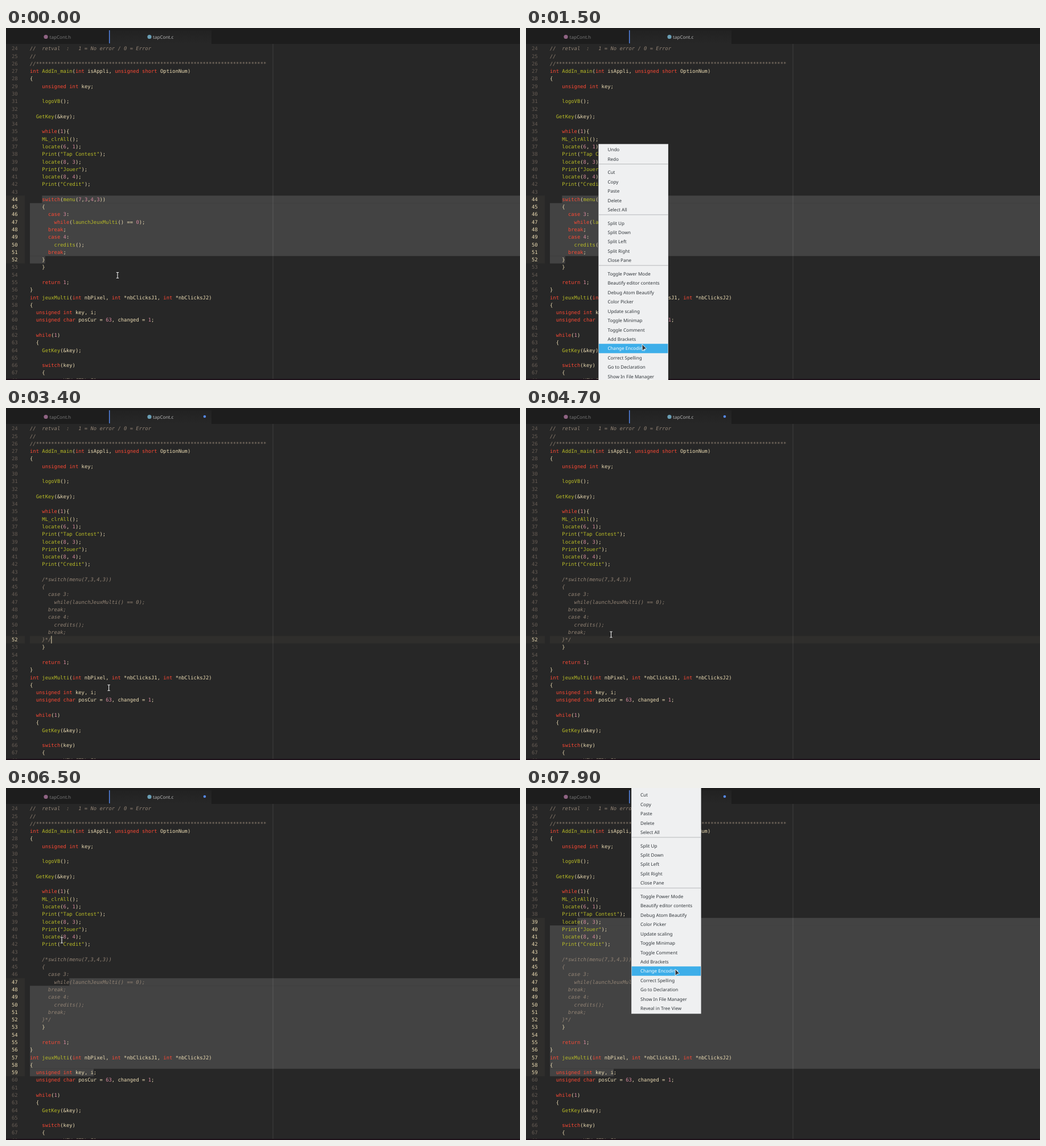
Write an HTML page that moves like this. It is 903x620 px and loops after 8000 ms.

```html
<!DOCTYPE html>
<html lang="en">
<head>
<meta charset="utf-8">
<title>Code editor</title>
<style>
  html, body { margin: 0; width: 100%; height: 100%; overflow: hidden; background: #272727; }
  svg { display: block; width: 903px; height: 620px; }
  text { white-space: pre; text-rendering: geometricPrecision; }
  .code { font: 8.86px "DejaVu Sans Mono", monospace; fill: #ebdbb2; }
  .ui { font: 8.08px "Noto Sans", sans-serif; }
  .num { text-anchor: end; fill: #665c54; }
  .num.on { fill: #ebdbb2; }
  .com { fill: #928374; font-style: italic; }
  .str, .fn { fill: #b8bb26; }
  .key { fill: #fb4934; }
  .lit { fill: #d3869b; }
  .item { fill: #31363b; }
  .item.on { fill: #fcfcfc; }
</style>
</head>
<body>
<svg viewBox="0 0 903 620">
  <defs>
    <linearGradient id="tab" x2="0" y2="1">
      <stop stop-color="#222"/><stop offset="1" stop-color="#272727"/>
    </linearGradient>
  </defs>
  <rect width="903" height="620" fill="#272727"/>
  <g id="marks"></g>
  <path d="M469 28V618" stroke="#fff" stroke-opacity=".12"/>
  <g id="code" class="code"></g>
  <rect width="903" height="28" fill="#1d1d1d"/>
  <rect x="181" y="4" width="180" height="24" fill="url(#tab)"/>
  <rect x="181" y="4" width="1.4" height="23" fill="#568af2"/>
  <circle cx="70" cy="15.5" r="3.6" fill="#8f6383"/>
  <circle cx="252" cy="15.5" r="3.6" fill="#6a9fb5"/>
  <g class="ui">
    <text x="76.5" y="18.6" fill="#777">tapCont.h</text>
    <text x="258" y="18.6" fill="#b4b4b4">tapCont.c</text>
  </g>
  <circle id="dot" cx="349" cy="15" r="2.3" fill="#568af2"/>
  <rect y="618" width="903" height="2" fill="#1c1018"/>
  <g id="menu" class="ui"></g>
  <path id="arrow" d="M0 0L7.6 7.8L4 8.6L.2 11.6Z" fill="#31363b" stroke="#f4f4f4" stroke-width=".9" stroke-linejoin="round"/>
  <g id="beam" fill="none">
    <path d="M-2.2 -5H2.2M0 -5V5M-2.2 5H2.2" stroke="#222" stroke-width="2.6"/>
    <path d="M-2.2 -5H2.2M0 -5V5M-2.2 5H2.2" stroke="#f4f4f4" stroke-width="1.1"/>
  </g>
</svg>
<script>
const FIRST = 24, ROW = 13.28, TOP = 29.6, LEFT = 42, CHAR = 5.334;
const PITCH = 16.45, GAP = 7;
const $ = id => document.getElementById(id);

const lines = `//  retval  :   1 = No error / 0 = Error
//
//${'*'.repeat(76)}
int AddIn_main(int isAppli, unsigned short OptionNum)
{
    unsigned int key;

    logoVB();

  GetKey(&key);

    while(1){
    ML_clrAll();
    locate(6, 1);
    Print("Tap Contest");
    locate(8, 3);
    Print("Jouer");
    locate(8, 4);
    Print("Credit");

    switch(menu(7,3,4,3))
    {
      case 3:
        while(launchJeuxMulti() == 0);
      break;
      case 4:
        credits();
      break;
    }
    }

    return 1;
}
int jeuxMulti(int nbPixel, int *nbClicksJ1, int *nbClicksJ2)
{
  unsigned int key, i;
  unsigned char posCur = 63, changed = 1;

  while(1)
  {
    GetKey(&key);

    switch(key)
    {
      case KEY_CTRL_F1:`.split('\n');

const groups = [
  'Undo,Redo',
  'Cut,Copy,Paste,Delete,Select All',
  'Split Up,Split Down,Split Left,Split Right,Close Pane',
  'Toggle Power Mode,Beautify editor contents,Debug Atom Beautify,Color Picker,Update scaling,' +
  'Toggle Minimap,Toggle Comment,Add Brackets,Change Encoding,Correct Spelling,' +
  'Go to Declaration,Show In File Manager,Reveal in Tree View'
].map(g => g.split(','));

const esc = s => s.replace(/&/g, '&amp;').replace(/</g, '&lt;');
const span = (cls, s) => `<tspan class="${cls}">${esc(s)}</tspan>`;
const rowTop = n => TOP + (n - FIRST) * ROW;
const colX = c => LEFT + c * CHAR;
const rect = (x, y, w, h, fill) => `<rect x="${x}" y="${y}" width="${w}" height="${h}" fill="${fill}"/>`;

const token = /(\/\/.*)|("[^"]*")|\b(int|unsigned|short|char|while|switch|case|break|return)\b|(\w+)(?=\()|\b(\d+)\b|&/g;
const paint = s => s.replace(token, (m, com, str, key, fn, lit) =>
  com ? span('com', m) : str ? span('str', m) : key ? span('key', m) :
  fn ? span('fn', m) : lit ? span('lit', m) : esc(m));

// Code lines; lines 44 to 52 also get a commented-out version
$('code').innerHTML = lines.map((s, i) => {
  const n = FIRST + i, y = rowTop(n) + 9.7;
  const put = (cls, body) => `<text class="${cls}" x="${LEFT}" y="${y}">${body}</text>`;
  let out = `<text class="num" x="20.7" y="${y}">${n}</text>`;
  if (n < 44 || n > 52) return out + put('', paint(s));
  const off = n == 44 ? s.replace('switch', '/*switch') : n == 52 ? s + '*/' : s;
  return out + put('live', paint(s)) + put('com dead', esc(off));
}).join('');

// Context menu
const centers = [];
let y = 10, parts = rect(0, 0, 122.5, 435, '#eff0f1') +
  '<rect id="hover" x=".5" width="121.5" height="16.45" fill="#3daee9"/>';
groups.forEach((g, k) => {
  if (k) {
    parts += rect(0, y - PITCH / 2, 122.5, 1, '#b6b9bb');
    y += GAP;
  }
  for (const name of g) {
    parts += `<text class="item" x="16" y="${y + 2.9}">${name}</text>`;
    centers.push(y);
    y += PITCH;
  }
});
$('menu').innerHTML = parts + '<rect x=".25" y=".25" width="122" height="434.5" fill="none" stroke="#bcbec0" stroke-width=".5"/>';

const nums = [...document.querySelectorAll('.num')];
const items = [...document.querySelectorAll('.item')];
const live = document.querySelectorAll('.live'), dead = document.querySelectorAll('.dead');

// Pointer path: time, x, y
const path = [
  [0, 196, 435.5], [300, 129, 427], [500, 134, 430], [900, 180, 455], [1000, 186, 466],
  [1500, 204, 557], [1700, 206, 600], [1800, 206, 577], [2400, 197.5, 531], [3100, 197.5, 531],
  [3500, 175, 480], [3900, 152, 426], [4000, 155, 374], [4100, 152, 399], [4300, 152, 399],
  [4700, 149.5, 399], [5200, 162.5, 341], [5600, 226, 533], [6000, 156, 502], [6100, 154, 498],
  [6200, 162.5, 341], [6300, 162.5, 341], [6400, 125, 300], [6500, 98, 268], [6700, 90, 230],
  [6900, 100, 250], [7200, 184.7, 398], [7400, 215, 506], [7700, 250, 385], [7900, 262, 319], [8000, 262, 319]
];

function pointer(t) {
  const i = path.findIndex(p => p[0] > t), [t0, x0, y0] = path[i - 1], [t1, x1, y1] = path[i];
  const k = (t - t0) / (t1 - t0);
  return [x0 + (x1 - x0) * k, y0 + (y1 - y0) * k];
}

// Selection as [line, column, line, column]
const selection = t =>
  t < 3300 ? [44, 4, 52, 5] :
  t < 6000 ? [52, 7, 52, 7] :
  t < 6400 ? [59, 21, 59, 21] :
  t < 6600 ? [47, 13, 59, 21] :
  t < 6700 ? [42, 10, 59, 21] : [39, 9, 59, 21];

function drawSelection(t) {
  const [a, ca, b, cb] = selection(t);
  let out = rect(0, rowTop(a), 33, (b - a + 1) * ROW, '#2f2e2c');
  if (a == b) {
    out += rect(LEFT, rowTop(a), 861, ROW, '#2f2e2c');
    if ((t - 3300) % 800 < 400) out += rect(colX(ca), rowTop(a), 1, ROW, '#ebdbb2');
  } else {
    out += rect(colX(ca), rowTop(a), 903 - colX(ca), ROW + .2, '#434343') +
      rect(LEFT, rowTop(a + 1), 861, (b - a - 1) * ROW + .2, '#434343') +
      rect(LEFT, rowTop(b), cb * CHAR, ROW, '#434343');
  }
  $('marks').innerHTML = out;
  nums.forEach((n, i) => n.classList.toggle('on', FIRST + i >= a && FIRST + i <= b));
}

const show = (el, on) => { el.style.display = on ? '' : 'none'; };
const place = (el, x, y) => el.setAttribute('transform', `translate(${x} ${y})`);

function draw(t) {
  const [x, y] = pointer(t), done = t >= 3300;
  const second = t >= 7300, open = second || (t >= 400 && t < 3200);
  const mx = second ? 185 : 127.5, my = second ? -37.5 : 204.5;

  drawSelection(t);
  live.forEach(el => show(el, !done));
  dead.forEach(el => show(el, done));
  show($('dot'), done);

  show($('menu'), open);
  place($('menu'), mx, my);
  $('menu').setAttribute('opacity', t == 3100 ? .62 : 1);
  const over = centers.findIndex(c => Math.abs(y - my - c) <= PITCH / 2);
  show($('hover'), over >= 0);
  if (over >= 0) $('hover').setAttribute('y', centers[over] - PITCH / 2);
  items.forEach((el, i) => el.classList.toggle('on', i == over));

  const arrow = t >= 7200 || (open && t < 3100);
  show($('arrow'), arrow);
  show($('beam'), !arrow);
  place($(arrow ? 'arrow' : 'beam'), x, y);
}

const start = performance.now();
let last = -1;
function tick() {
  const t = Math.floor((performance.now() - start) % 8000 / 100) * 100;
  if (t != last) draw(last = t);
  requestAnimationFrame(tick);
}
tick();
</script>
</body>
</html>
```
